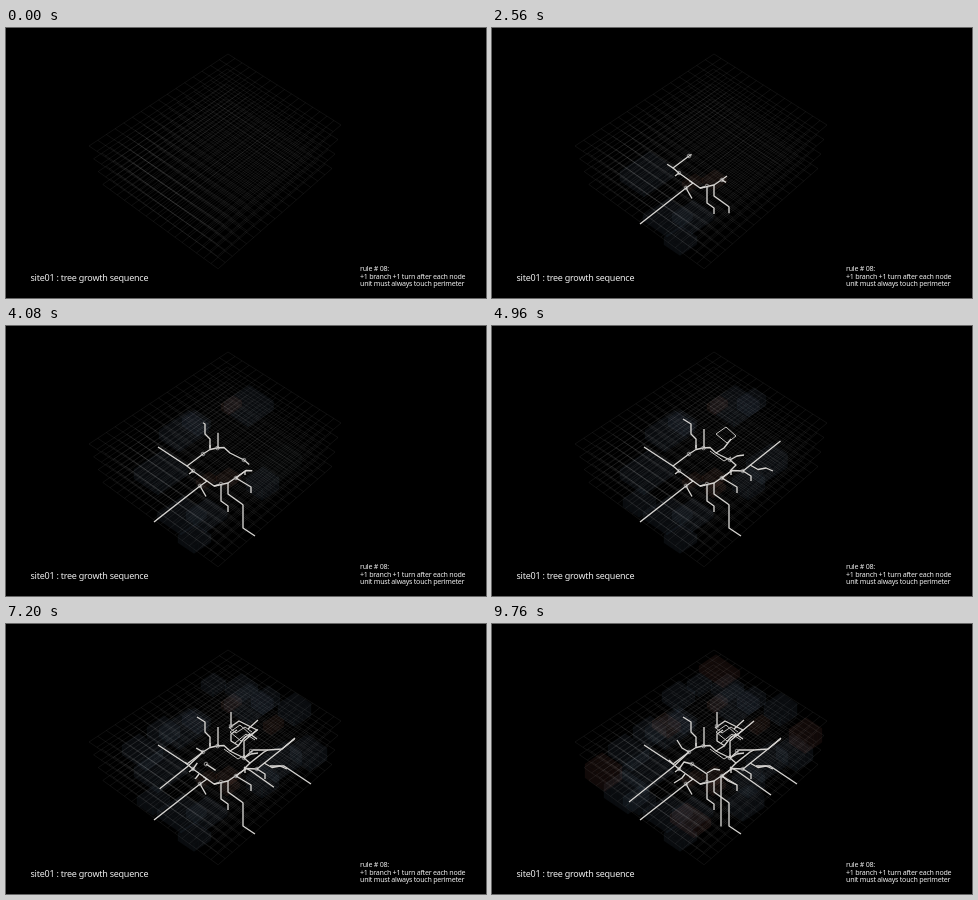
These frames come from a looping animation (480x270 px, 9.92 s). An HTML page:

```html
<!DOCTYPE html>
<html lang="en">
<meta charset="utf-8">
<title>Tree growth sequence</title>
<style>
  html, body { margin: 0; width: 100%; height: 100%; overflow: hidden; background: #000; }
  svg { display: block; width: 100vw; height: 100vh; }
  path, circle { fill: none; }
  #grid path { stroke: #fff; stroke-opacity: .1; stroke-width: .6; }
  #tree path { stroke: #d6d4d1; stroke-width: 1.35; stroke-linejoin: round; stroke-dasharray: 1 2; }
  #tree path.thin { stroke: #c4c2bf; stroke-width: 1; }
  #tree circle { stroke: #aaa; stroke-width: .8; }
  text { fill: #eee; font-family: "Noto Sans", sans-serif; font-weight: 500; }
</style>
<svg viewBox="0 0 480 270">
  <g id="blocks"></g>
  <g id="grid"></g>
  <g id="tree"></g>
  <text x="24.5" y="253.3" font-size="9" letter-spacing="-.24">site01 : tree growth sequence</text>
  <g font-size="7.1" letter-spacing="-.25">
    <text x="354" y="243.2">rule # 08:</text>
    <text x="354" y="250.6">+1 branch +1 turn after each node</text>
    <text x="354" y="258">unit must always touch perimeter</text>
  </g>
</svg>
<script>
const LOOP = 9920, STEP = 80, CELLS = 16;
const parts = [];

function add(parent, tag, attrs) {
  const el = document.createElementNS('http://www.w3.org/2000/svg', tag);
  for (const key in attrs) el.setAttribute(key, attrs[key]);
  document.getElementById(parent).append(el);
  return el;
}

const mix = (a, b, k) => [a[0] + (b[0] - a[0]) * k, a[1] + (b[1] - a[1]) * k];

// One floor plate, given by its left, top, right and bottom corners
function plate(left, top, right, bottom) {
  let d = '';
  for (let i = 0; i <= CELLS; i++) {
    const k = i / CELLS;
    d += `M${mix(left, top, k)}L${mix(bottom, right, k)}`;
    d += `M${mix(left, bottom, k)}L${mix(top, right, k)}`;
  }
  add('grid', 'path', { d });
}

for (let i = 0; i < 4; i++) {
  plate([83 + 4.6 * i, 118 + 12.8 * i], [222 - .7 * i, 26 + 15 * i],
        [335 - 3 * i, 97 + 14.5 * i], [210 + .7 * i, 203 + 12.6 * i]);
}

// Prism of a by b cells whose top face has its left corner at x, y
function block(time, color, x, y, a, b, h) {
  const at = (u, v, z = 0) => [x + 8.5 * u + 8 * v, y - 5.7 * u + 5.4 * v + z];
  let lines = '';
  for (let u = 0; u <= a; u += .5) lines += `M${at(u, 0)}L${at(u, b)}L${at(u, b, h)}`;
  for (let v = 0; v <= b; v += .5) lines += `M${at(a, v)}L${at(0, v)}L${at(0, v, h)}`;
  const outline = [at(0, 0), at(a, 0), at(a, b), at(a, b, h), at(0, b, h), at(0, 0, h)];
  const body = add('blocks', 'path', { d: `M${outline.join('L')}Z`, style: `fill:${color};fill-opacity:.11` });
  const mesh = add('blocks', 'path', { d: lines, stroke: color, 'stroke-opacity': .07, 'stroke-width': .5 });
  parts.push(t => {
    const shown = Math.min(1, Math.max(0, (t - time) / 240));
    body.style.opacity = mesh.style.opacity = shown;
  });
}
const blue = (...args) => block(args[0], '#56687c', ...args.slice(1));
const red = (...args) => block(args[0], '#96584c', ...args.slice(1));

// Lines that grow from start to end
function grow(start, end, paths, kind = '') {
  for (const d of paths) {
    const el = add('tree', 'path', { d, pathLength: 1, class: kind });
    parts.push(t => {
      const k = Math.min(1, Math.max(0, (t - start) / (end - start)));
      el.style.strokeDashoffset = 1 - k;
      el.style.visibility = k > 0 ? 'visible' : 'hidden';
    });
  }
}

function node(time, cx, cy) {
  const el = add('tree', 'circle', { cx, cy, r: 1.8 });
  parts.push(t => el.style.visibility = t >= time ? 'visible' : 'hidden');
}

blue(900, 151, 187, 3, 3, 6);
blue(1120, 180, 186, 2.5, 2.5, 7);
red(1200, 190, 154, 1.5, 1, 4);
blue(1680, 128, 143, 3.5, 3, 10);
blue(1840, 172, 209, 2, 2, 8);
red(2000, 210, 150, 1.5, 1.5, 5);
blue(2560, 153, 104, 3.5, 2.5, 9);
blue(2800, 240, 152, 2, 2, 12);
blue(3000, 176, 92, 1.5, 2, 8);
blue(3600, 218, 76, 3, 3, 9);
red(3800, 215, 78, 1.5, 1, 6);
blue(4000, 254, 134, 3, 2, 14);
red(4200, 213, 162, 1.5, 1, 5);
blue(4560, 245, 73, 2, 1.5, 10);
blue(4700, 131, 173, 2, 2, 8);
blue(5600, 195, 57, 1.5, 1.5, 8);
blue(5760, 219, 61, 2, 2, 8);
blue(5920, 272, 80, 2, 2, 12);
red(6000, 257, 99, 1.5, 1, 7);
blue(6160, 284, 122, 2, 2.5, 12);
blue(6720, 141, 103, 2, 2, 11);
blue(6960, 116, 121, 2, 3, 10);
blue(7200, 235, 175, 2.5, 2, 12);
blue(7440, 112, 160, 2.5, 3, 14);
blue(7680, 170, 68, 2, 2, 10);
red(7680, 207, 42, 2, 3, 6);
red(7760, 297, 105, 2, 2, 14);
red(7840, 93, 140, 2, 2.5, 14);
red(7920, 178, 190, 2, 3, 8);
red(7920, 160, 97, 1.5, 2, 7);

// First trunk and its fork
grow(400, 1040, ['M148 196L194 160L201 155']);
grow(1040, 1440, ['M201 155L197.5 153', 'M201 155L208 160L213 159', 'M194 160L200 170.5']);
node(960, 194, 160);

// Along the ring in both directions
grow(1600, 2160, [
  'M201 155L187 145L181 140L197 128',
  'M208 160L222 157L230 151.5L235 148',
  'M215 158L215 175L222 180L222 186',
  'M222 157L222 168L236 178',
]);
grow(1840, 2000, ['M187 145L183 148']);
node(1760, 187, 145);
node(1840, 215, 158);
node(2160, 230, 152);

grow(2400, 3200, [
  'M181 140L152 121',
  'M236 178L237 179L237 202L249 210',
  'M197 128L204 123.5L211 122',
  'M230 152L245 161L245 167',
]);
grow(2640, 3040, ['M235 148L240 144.5', 'M239 145L239 149', 'M204 123.5L204 119']);
node(2480, 197, 128);
node(3040, 211.5, 122);

// Closing the ring, with arms to the north and east
grow(3440, 4240, [
  'M204 122L204 113L199 108L199 98L191 93',
  'M212 122L212 103',
  'M211 122L218 121.5L224 127L238 134L244 139L238 145',
  'M230 152L240 144.5L251 145',
]);
grow(4160, 4720, ['M251 145L288.5 115', 'M251 145L259 150L259 155', 'M238 134L245 130L252 129']);
grow(4400, 4880, ['M258 139L266 143.5L274 142L281 145', 'M224 127L232 122L239 113']);
grow(4480, 4960, ['M224 108L234 101L244 110L235 117L224 108', 'M218 125L232 135L239 131'], 'thin');
node(4160, 251, 145);
node(4000, 238, 134);

// Dense knot in the north-east
grow(5000, 5520, [
  'M238 134L247 126L262 126L276 125L289 114',
  'M239 113L244 110L251 115',
  'M233 122L225 117L225 110L231 106',
]);
grow(5520, 6160, [
  'M264 142L278 142L305 160',
  'M225 102L225 88',
  'M223 104L233 97L251 106L242 113',
  'M242 105L252 96',
  'M244 139L258 128L262 126',
]);
grow(5600, 6080, ['M224 104L230 109L239 103L246 108', 'M229 119L240 110L249 116'], 'thin');
node(5760, 225, 102);
node(5920, 245, 127);

// Long arms back to the perimeter
grow(6560, 7440, [
  'M238 134L238 117L262 97',
  'M238 143L245 147L279 171',
  'M197 128L181 143L137 178',
]);
grow(6880, 7600, [
  'M197 128L190 124L185 116',
  'M181 140L177 136',
  'M193 150L190 154L182 159',
  'M200 140L215 150L215 158',
  'M187 145L192 138L200 140',
]);
node(7120, 200, 140);
grow(7600, 8080, ['M230 152L236 157L245 161', 'M215 149L222 145L228 146']);
grow(8080, 8880, ['M229 152L229 202.5']);

function draw(now) {
  const t = Math.floor(now % LOOP / STEP) * STEP;
  for (const update of parts) update(t);
  requestAnimationFrame(() => draw(performance.now() - begin));
}
const begin = performance.now();
draw(0);
</script>
</html>
```
